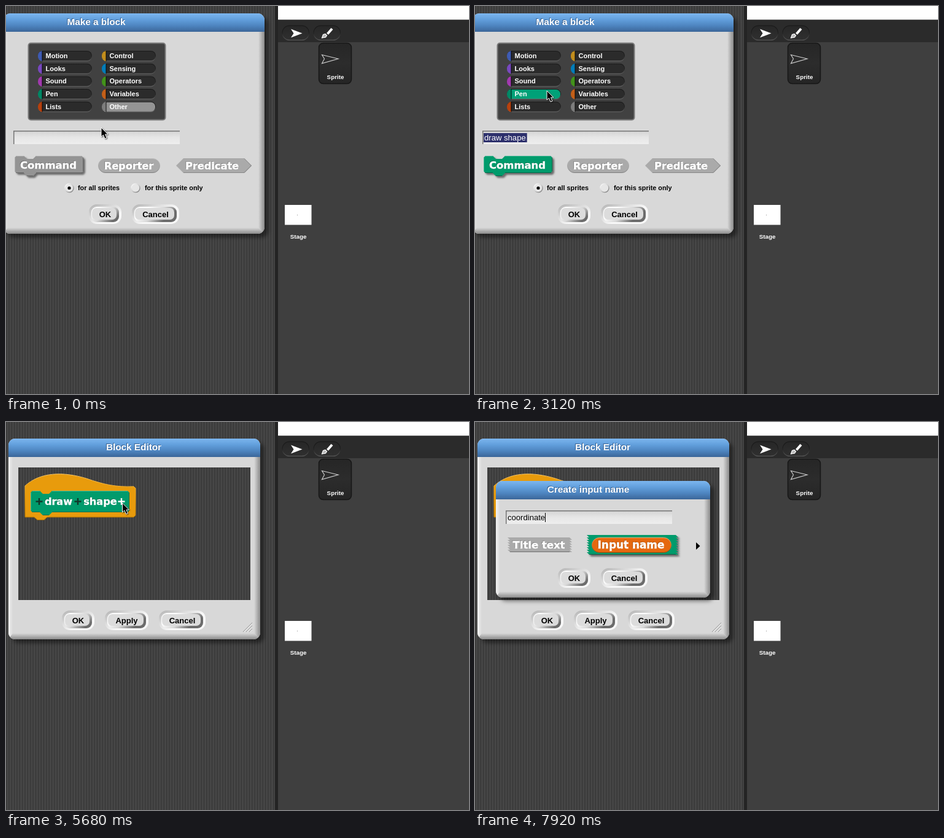
Recreate the animation shown at these times as an HTML page with a canvas. Size 754 px wide and 632 px high, loop 8000 ms.

```html
<!DOCTYPE html>
<html lang="en">
<head>
<meta charset="utf-8">
<title>Make a block</title>
<style>
html, body { margin: 0; overflow: hidden; background: #3f3f3f; }
canvas { display: block; }
</style>
</head>
<body>
<canvas width="754" height="632"></canvas>
<script>
const g = document.querySelector('canvas').getContext('2d');
const SANS = '"Liberation Sans", Arial, sans-serif';
const BLOCK = '"DejaVu Sans", Verdana, sans-serif';
const PEN = '#009b6c', GREY = '#949494', ORANGE = '#e89b0c';
const LEFT = [['Motion', '#4a6cd4'], ['Looks', '#8f56e3'], ['Sound', '#c044d0'], ['Pen', '#00a178'], ['Lists', '#d94d11']];
const RIGHT = [['Control', '#e6a822'], ['Sensing', '#0494dc'], ['Operators', '#4fae20'], ['Variables', '#e8711d'], ['Other', GREY]];

const lerp = (a, b, k) => a + (b - a) * k;
const ease = k => k * k * (3 - 2 * k);

function rect(x, y, w, h, fill) {
  g.fillStyle = fill;
  g.fillRect(x, y, w, h);
}
function round(x, y, w, h, r, fill, stroke, lw = 1) {
  g.beginPath();
  g.roundRect(x, y, w, h, r);
  if (fill) { g.fillStyle = fill; g.fill(); }
  if (stroke) { g.strokeStyle = stroke; g.lineWidth = lw; g.stroke(); }
}
function poly(points, fill, stroke, lw = 1) {
  g.beginPath();
  for (let i = 0; i < points.length; i += 2) g.lineTo(points[i], points[i + 1]);
  g.closePath();
  if (fill) { g.fillStyle = fill; g.fill(); }
  if (stroke) { g.strokeStyle = stroke; g.lineWidth = lw; g.stroke(); }
}
function line(x1, y1, x2, y2, color, lw = 1) {
  g.strokeStyle = color;
  g.lineWidth = lw;
  g.beginPath();
  g.moveTo(x1, y1);
  g.lineTo(x2, y2);
  g.stroke();
}
function gradient(x1, y1, x2, y2, ...colors) {
  const gr = g.createLinearGradient(x1, y1, x2, y2);
  colors.forEach((c, i) => gr.addColorStop(i / (colors.length - 1), c));
  return gr;
}
function text(s, x, y, size, color, { font = SANS, weight = 'bold', align = 'left' } = {}) {
  g.font = `${weight} ${size}px ${font}`;
  g.textAlign = align;
  g.fillStyle = color;
  g.fillText(s, x, y);
}
function blockText(s, x, y, size) {
  shadow(-1, -1, 0, 'rgba(0,0,0,.25)');
  text(s, x, y, size, '#fff', { font: BLOCK, align: 'center' });
  noShadow();
  g.strokeStyle = '#fff';
  g.lineWidth = .4;
  g.strokeText(s, x, y);
}
function shadow(x, y, blur, color = 'rgba(0,0,0,.5)') {
  g.shadowOffsetX = x;
  g.shadowOffsetY = y;
  g.shadowBlur = blur;
  g.shadowColor = color;
}
function noShadow() { g.shadowColor = 'transparent'; }

function stripes(x, y, w, h) {
  const step = 4.35;
  rect(x, y, w, h, '#464646');
  for (let i = Math.ceil(x / step) * step; i < x + w - 1; i += step) rect(i, y, 1.2, h, '#363636');
}

function workspace() {
  stripes(0, 0, 438, 632);
  rect(438, 0, 5, 632, '#242424');
  rect(443, 0, 311, 632, '#3f3f3f');
  rect(443, 0, 311, 22.5, '#fff');
  rect(443, 22.5, 311, 36.5, '#2b2b2b');
  for (const x of [450, 501]) {
    round(x, 32, 43.5, 23.5, 12, gradient(0, 31, 0, 56, '#262626', '#303030'), gradient(0, 32, 0, 56, '#161616', '#202020', '#5e5e5e'), 1.2);
  }
  poly([464, 37.5, 482.5, 44.5, 464, 51.5, 468.5, 44.5], '#fff');
  line(531, 37, 523.5, 45.5, '#fff', 4);
  poly([514.5, 52, 516.5, 46.5, 520, 45.5, 522.5, 48, 520.5, 51], '#bbb', '#fff', 1.2);

  round(509.5, 60.5, 53, 66, 7, gradient(0, 60, 0, 127, '#262626', '#2c2c2c', '#252525'), '#171717', 1.5);
  poly([514.5, 79.5, 541, 86, 514.5, 93.5, 518.5, 86], null, '#d0d0d0', 1.1);
  text('Sprite', 536.5, 119, 9.8, '#fff', { align: 'center' });
  rect(454, 324, 43.5, 32.5, '#fff');
  rect(474, 340, 1, 1, '#888');
  text('Stage', 476, 378.5, 9.8, '#fff', { align: 'center' });
}

function dialog(x, y, w, h, title, titleX) {
  const r = x + w, b = y + h;
  shadow(6, 6, 6, 'rgba(0,0,0,.45)');
  round(x, y, w, h, 11, '#d8d8d8');
  noShadow();
  g.save();
  round(x, y, w, h, 11);
  g.clip();
  rect(x, y + 30, 7, h, gradient(x, 0, x + 7, 0, '#f4f4f4', '#d8d8d8'));
  poly([r, y + 30, r, b, r - 10, b - 10, r - 10, y + 30], gradient(r - 10, 0, r, 0, '#d8d8d8', '#8a8a8a'));
  poly([x, b, r, b, r - 10, b - 10, x + 7, b - 10], gradient(0, b - 10, 0, b, '#d8d8d8', '#8a8a8a'));
  rect(x, y, w, 30, gradient(0, y, 0, y + 30, '#7cb6ef', '#629fdc', '#4e85c0', '#3b6699'));
  g.restore();
  shadow(-1, -1, 0, 'rgba(30,60,100,.6)');
  text(title, titleX, y + 19, 15.3, '#fff', { align: 'center' });
  noShadow();
}

function button(label, x, y, w) {
  round(x, y, w, 32, 13, gradient(x, y, x + 16, y + 32, '#b0b0b0', '#d8d8d8', '#f8f8f8'));
  round(x + 4, y + 4, w - 8, 25, 9, gradient(x + w / 2 - 10, y + 4, x + w / 2 + 10, y + 29, '#fff', '#d8d8d8', '#6c6c6c'));
  round(x + 5, y + 6, w - 13, 19, 7, '#dcdcdc');
  text(label, x + w / 2, y + 21, 13, '#000', { align: 'center' });
}

function field(x, y, typed, selected, caret) {
  rect(x, y, 271, 22, gradient(0, y, 0, y + 22, '#d2d2d2', '#e6e6e6', '#eee'));
  rect(x, y, 271, 1.5, '#747474');
  rect(x, y, 1.5, 22, '#747474');
  g.font = `13.1px ${SANS}`;
  const w = g.measureText(typed).width;
  if (selected) rect(x + 2, y + 4, w + 3, 15, '#2d306c');
  text(typed, x + 3, y + 16, 13.1, selected ? '#fff' : '#000', { weight: 'normal' });
  if (caret) rect(Math.round(x + 3 + w), y + 4, 1, 15, '#000');
}

function category([name, color], x, row, selected, hover) {
  const y = 73 + row * 20.7;
  round(x, y, 88, 17, 8, gradient(0, y, 0, y + 17, '#191919', '#222', '#6c6c6c'));
  round(x + 1, y + 1, 86, 15, 7, selected ? color : hover ? '#1b1b1b' : '#2b2b2b');
  g.save();
  round(x, y, 88, 17, 8);
  g.clip();
  rect(x, y, 7, 17, color);
  // the cap is lined with fine dark rules
  for (let i = 1; i < 17; i += 2.2) rect(x, y + i, 7, 1, 'rgba(0,0,0,.35)');
  rect(x + 6, y, 2, 17, 'rgba(0,0,0,.45)');
  g.restore();
  text(name, x + 12.5, y + 12, 11, '#fff');
}

function jigsaw(x, y, w, h, color, lift) {
  const n = x + 15, b = y + h;
  if (lift) shadow(3, 3, 3);
  poly([x, y + 3, x + 3, y, n, y, n + 5, y + 5, n + 15, y + 5, n + 20, y, x + w - 3, y, x + w, y + 3,
    x + w, b - 3, x + w - 3, b, n + 20, b, n + 15, b + 5, n + 5, b + 5, n, b, x + 3, b, x, b - 3], color);
  noShadow();
  line(x + 2, b - .5, n, b - .5, 'rgba(0,0,0,.3)');
  line(n + 5, b + 4.5, n + 15, b + 4.5, 'rgba(0,0,0,.3)');
  line(n + 20, b - .5, x + w - 2, b - .5, 'rgba(0,0,0,.3)');
  line(x + w - .5, y + 3, x + w - .5, b - 3, 'rgba(0,0,0,.3)');
  line(x + .5, y + 3, x + .5, b - 3, 'rgba(255,255,255,.3)');
  line(x + 3, y + .5, n, y + .5, 'rgba(255,255,255,.3)');
  line(n + 20, y + .5, x + w - 3, y + .5, 'rgba(255,255,255,.3)');
}

function ragged(x, y, w, h, color) {
  const pts = [];
  for (let i = 0; i <= h; i += 4) pts.push(x, y + i, x + 4, y + Math.min(h, i + 4));
  for (let i = h; i >= 0; i -= 4) pts.push(x + w, y + i, x + w - 4, y + Math.max(0, i - 4));
  poly(pts, color);
  line(x + 4, y + h - .5, x + w - 4, y + h - .5, 'rgba(0,0,0,.35)');
}

function radio(x, on) {
  g.beginPath();
  g.arc(x, 296.5, 7, 0, 7);
  g.fillStyle = '#e6e6e6';
  g.fill();
  g.strokeStyle = gradient(x - 6, 290, x + 6, 303, '#fff', '#ccc', '#777');
  g.lineWidth = 1.5;
  g.stroke();
  if (!on) return;
  g.beginPath();
  g.arc(x, 296.5, 2.6, 0, 7);
  g.fillStyle = '#000';
  g.fill();
}

function makeBlock(t, [mx, my]) {
  const pen = t >= 2880;
  dialog(-4, 12, 425, 359, 'Make a block', 147);
  round(36.5, 60.5, 223, 125, 4, '#414141', '#7a7a7a', 2);
  LEFT.forEach((c, i) => {
    const hover = mx > 52 && mx < 140 && Math.abs(my - 81.5 - i * 20.7) < 9;
    category(c, 52, i, pen && i === 3, hover);
  });
  RIGHT.forEach((c, i) => category(c, 156, i, !pen && i === 4));

  const count = t < 320 ? 0 : t < 960 ? Math.min(4, 1 + Math.floor((t - 320) / 160)) : Math.min(10, 4 + Math.floor((t - 880) / 160));
  field(12, 203, 'draw shape'.slice(0, count), pen, count > 0 && !pen);

  jigsaw(14, 244, 112, 28, pen ? PEN : GREY, true);
  blockText('Command', 69, 265, 16.4);
  round(150.5, 248.5, 100, 23, 11.5, '#aaa', gradient(0, 248, 0, 272, '#c0c0c0', '#aaa', '#7c7c7c'));
  blockText('Reporter', 200, 266, 16.1);
  poly([277, 260, 289, 248, 388, 248, 400, 260, 388, 272, 289, 272], '#aaa');
  line(289, 271.5, 388, 271.5, '#888');
  line(388, 271.5, 399.5, 260, '#777');
  line(388, 248.5, 399.5, 260, '#888');
  blockText('Predicate', 335.5, 266, 16.2);

  radio(103, true);
  radio(211, false);
  text('for all sprites', 117, 300, 10.85, '#000');
  text('for this sprite only', 226, 300, 10.85, '#000');
  button('OK', 135, 323, 53);
  button('Cancel', 205, 323, 77);
}

function plus(x, color) {
  line(x - 5.5, 129.5, x + 5.5, 129.5, color, 2.4);
  line(x, 124, x, 135, color, 2.4);
}

function blockEditor([mx, my]) {
  dialog(4, 27, 410, 327, 'Block Editor', 208);
  stripes(20, 74, 378, 216);
  g.beginPath();
  g.moveTo(31, 155);
  g.lineTo(31, 104);
  g.bezierCurveTo(55, 82, 92, 80, 131, 92);
  g.bezierCurveTo(160, 102, 178, 106, 208, 105);
  g.lineTo(211, 108);
  g.lineTo(211, 152);
  g.lineTo(208, 155);
  for (const [x, y] of [[67, 155], [62, 159.5], [51, 159.5], [46, 155]]) g.lineTo(x, y);
  g.closePath();
  g.fillStyle = ORANGE;
  g.fill();
  g.strokeStyle = gradient(0, 86, 0, 158, '#f5c566', ORANGE, '#a86f05');
  g.lineWidth = 1;
  g.stroke();
  jigsaw(40, 112, 161, 35, PEN, false);
  blockText('draw', 85.5, 135, 16.1);
  blockText('shape', 153.5, 135, 16.2);
  plus(54, '#10372a');
  plus(117, '#10372a');
  plus(188, Math.abs(mx - 189) < 8 && Math.abs(my - 130) < 10 ? '#fff' : '#10372a');
  button('OK', 91, 307, 53);
  button('Apply', 161, 307, 71);
  button('Cancel', 249, 307, 76);
  for (const d of [0, 5, 10]) {
    line(386 + d, 342, 401, 327 + d, '#888');
    line(387 + d, 342, 401, 328 + d, '#fafafa');
  }
}

function inputName(t) {
  const count = t < 6160 ? 0 : Math.min(10, 1 + Math.floor((t - 6160) / 160));
  dialog(34, 96, 349, 190, 'Create input name', 184.5);
  field(50, 144, 'coordinate'.slice(0, count), false, true);
  ragged(53, 188, 105, 24, '#aaa');
  blockText('Title text', 104, 206, 16.5);
  shadow(3, 3, 3);
  ragged(182, 184, 149, 32, PEN);
  noShadow();
  round(190.5, 188.5, 129, 24, 12, '#e5680f', gradient(0, 188, 0, 212, '#f6ae78', '#a34606'));
  blockText('Input name', 254, 206, 16.9);
  poly([360, 196, 366.5, 202, 360, 208], '#000');
  button('OK', 135, 238, 53);
  button('Cancel', 205, 238, 76);
}

// time, x, y of the pointer tip
const PATH = [[0, 155, 198], [2080, 155, 198], [2640, 117, 138], [3520, 117, 138], [4240, 143, 334],
  [4800, 143, 334], [5520, 189.5, 132], [8000, 189.5, 132]];

function pointerAt(t) {
  const i = PATH.findIndex(p => p[0] > t);
  const [t0, x0, y0] = PATH[i - 1], [t1, x1, y1] = PATH[i];
  const k = ease((t - t0) / (t1 - t0));
  return [lerp(x0, x1, k), lerp(y0, y1, k)];
}

function pointer([x, y]) {
  g.save();
  g.translate(x, y);
  shadow(1, 1, 2);
  poly([0, 0, 0, 15, 3.5, 12, 6, 18, 9, 17, 6.5, 11, 11, 11], '#000', '#fff');
  noShadow();
  g.restore();
}

function draw(now) {
  const t = Math.floor(now % 8000 / 80) * 80;
  const mouse = pointerAt(t);
  workspace();
  if (t < 4480) makeBlock(t, mouse);
  else blockEditor(mouse);
  if (t >= 5840) inputName(t);
  if (t < 320 || t >= 2080 && t < 6160) pointer(mouse);
}

const start = performance.now();
function tick() {
  draw(performance.now() - start);
  requestAnimationFrame(tick);
}
tick();
</script>
</body>
</html>
```
